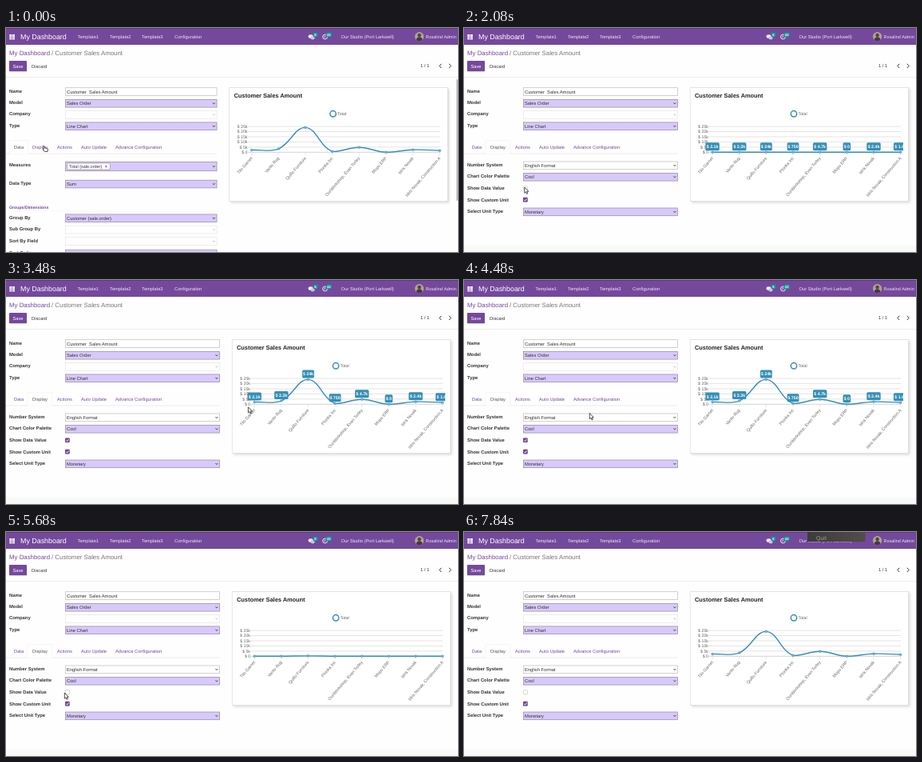
Write an HTML page that moves like this. It is 566 px wide and 280 px high and loops after 8.56 s.

```html
<!DOCTYPE html>
<html lang="en">
<head>
<meta charset="utf-8">
<title>Dashboard chart</title>
<style>
html, body { margin: 0; width: 100%; height: 100%; overflow: hidden; background: #fefefe; }
svg { display: block; width: 100%; height: 100%; }
text { font-family: "Liberation Sans", Arial, sans-serif; font-size: 5.75px; fill: #333; white-space: pre; text-rendering: geometricPrecision; }
.b { font-weight: bold; font-size: 5.85px; }
.w { fill: #fff; }
.nav { fill: #eee4f5; }
.p { fill: #74499c; }
.ax { font-size: 5.3px; fill: #666; }
</style>
</head>
<body>
<svg id="stage" viewBox="0 0 566 280" preserveAspectRatio="none"></svg>
<script>
const LOOP = 8560, OPEN = 480, LABELS_ON = 2080, LABELS_OFF = 5560, RISE = 1000;
const PURPLE = '#74499c', LILAC = '#d8c9fb', BLUE = '#368fb7';
const X0 = 311.1, STEP = 33.65, BASE = 155.3, UNIT = 1.288;

const points = [
  ['Tilo Garnet', 2.1, '$ 2.1k'], ['Vanto Rug', 3.3, '$ 3.3k'],
  ['Quillo Furniture', 24, '$ 24k'], ['Plonka Inc', .75, '$ 750'],
  ['OurWorkshop, Evan Torley', 4.7, '$ 4.7k'], ['Mopu ERP', 0, '$ 0'],
  ['Idris Novak', 2.4, '$ 2.4k'], ['Idris Novak, Construction A', 1.6, '$ 1.6k']
];

// time, x, y of the pointer tip
const path = [
  [480, 48, 148], [960, 66, 193.5], [1360, 70, 197], [1560, 75.5, 198.5], [2080, 75.5, 198.5],
  [2760, 302, 162], [2920, 303, 159], [3800, 303, 158], [4480, 157, 166], [4640, 92, 190],
  [4760, 88, 192], [5500, 73, 200.5], [5680, 73, 200.5], [6480, 304, 150], [6680, 505, -12]
];

const text = (x, y, s, cls = '', style = '', more = '') =>
  `<text x="${x}" y="${y}" class="${cls}" style="${style}" ${more}>${s}</text>`;
const rect = (x, y, w, h, fill, more = '') => `<rect x="${x}" y="${y}" width="${w}" height="${h}" fill="${fill}" ${more}/>`;
const line = (x1, y1, x2, y2, color, w = .7) =>
  `<path d="M${x1} ${y1}L${x2} ${y2}" stroke="${color}" stroke-width="${w}" fill="none"/>`;
const middle = 'text-anchor="middle"';

const chevron = (x, y, color = '#222') =>
  `<path d="M${x - 1.4} ${y - .7}l1.4 1.4 1.4-1.4" stroke="${color}" stroke-width=".9" fill="none"/>`;

function field(label, y, value, right, kind) {
  const fill = kind === 'lilac' ? LILAC : '#fff';
  const edge = { lilac: '#96899f', faint: '#e6e6e6' }[kind] || '#bdbdbd';
  const arrow = kind === 'plain' ? '' : chevron(right - 3.7, y, kind === 'faint' ? '#bbb' : '#222');
  return text(4, y + 1, label, 'b') +
    rect(74.5, y - 4.8, right - 74.5, 9.7, fill, `stroke="${edge}" stroke-width=".7"`) +
    text(76, y + 2.1, value) + arrow;
}

function check(y, id) {
  return rect(74.3, y - 2.7, 5.2, 5.2, '#fff', 'rx=".8" stroke="#bbb" stroke-width=".6"') +
    `<g ${id ? `id="${id}"` : ''}>${rect(74, y - 3, 5.7, 5.7, PURPLE, 'rx=".8"')}
    <path d="M75.3 ${y}l1.2 1.3 2-2.6" stroke="#fff" stroke-width=".9" fill="none"/></g>`;
}

function tabs(active, right) {
  const items = [['Data', 10, 12], ['Display', 33, 19], ['Actions', 64, 19], ['Auto Update', 94, 32], ['Advance Configuration', 137, 58]];
  return line(0, 157, right, 157, '#e2e2e2') + items.map(([name, x, w], i) => {
    const on = i === active;
    const box = on ? `<path d="M${x - 6} 157.5V140.5H${x + w + 6}V157.5" fill="#fefefe" stroke="#f0f0f0" stroke-width=".6"/>` : '';
    return box + text(x, 150.6, name, on ? '' : 'p', on ? 'fill:#5a5460' : '');
  }).join('');
}

function topFields(right) {
  return field('Name', 79.5, 'Customer  Sales Amount', right, 'plain') +
    field('Model', 94.2, 'Sales Order', right, 'lilac') +
    field('Company', 108.4, '', right, 'faint') +
    field('Type', 122.7, 'Line Chart', right, 'lilac');
}

function dataTab() {
  const r = 264;
  return topFields(r) + tabs(0, r) +
    text(4, 173, 'Measures', 'b') +
    rect(74.5, 167.3, r - 74.5, 11.4, LILAC, 'stroke="#96899f" stroke-width=".7"') +
    rect(76.5, 169, 54, 8, '#fff', 'rx="1.5" stroke="#8e7aa3" stroke-width=".6"') +
    text(79, 174.8, 'Total (sale.order)', '', 'font-size:5.5px') +
    line(124.2, 171.8, 126.6, 174.2, '#333') + line(126.6, 171.8, 124.2, 174.2, '#333') +
    chevron(r - 3.7, 173) +
    field('Data Type', 195, 'Sum', r, 'lilac') +
    text(4, 226, 'Groups/Dimensions', 'b p', 'font-size:5.2px') +
    line(4, 229, r, 229, '#f2f2f2') +
    field('Group By', 237.7, 'Customer (sale.order)', r, 'lilac') +
    field('Sub Group By', 252, '', r, 'faint') +
    field('Sort By Field', 266.5, '', r, 'faint') +
    field('Sort Order', 282, '', r, 'lilac') +
    rect(564, 64, 2, 152, '#bcbcbc', 'rx="1"');
}

function displayTab() {
  const r = 267.5;
  return rect(0, 272, 566, 8, '#f7faf6') + topFields(r) + tabs(1, r) +
    field('Number System', 171.8, 'English Format', r, 'white') +
    field('Chart Color Palette', 186.2, 'Cool', r, 'lilac') +
    text(4, 202.3, 'Show Data Value', 'b') + check(200.4, 'tick') +
    text(4, 216.8, 'Show Custom Unit', 'b') + check(214.8) +
    field('Select Unit Type', 229.8, 'Monetary', r, 'lilac');
}

function header() {
  const tiles = [0, 1, 2, 3, 4, 5].map(i =>
    rect(4.3 + i % 2 * 3.6, 8 + (i >> 1) * 2.3, 3.1, 1.8, '#fff')).join('');
  const badge = (x, n) => rect(x - 3, 5.4, n > 9 ? 7.5 : 6, 5.8, '#0d9d96', 'rx="2.8"') +
    text(x + (n > 9 ? .7 : 0), 9.9, n, 'w b', 'font-size:4.2px', middle);
  return rect(0, 0, 566, 21, PURPLE) + rect(0, 0, 566, .8, '#5c3a7c') + tiles +
    text(18, 14, 'My Dashboard', 'w', 'font-size:8.9px') +
    [['Template1', 89.5], ['Template2', 130], ['Template3', 170], ['Configuration', 211]]
      .map(([s, x]) => text(x, 12.6, s, 'nav')).join('') +
    '<ellipse cx="381.5" cy="10.5" rx="3" ry="2.3" fill="#eee"/><ellipse cx="384" cy="12.5" rx="2.6" ry="2" fill="#cfc0dc"/>' +
    badge(387.5, 6) +
    '<circle cx="399.5" cy="11" r="2.9" fill="none" stroke="#eee" stroke-width="1"/><path d="M399.5 9.3V11.3H398" stroke="#eee" stroke-width=".7" fill="none"/>' +
    badge(403.5, 42) +
    text(419.5, 12.6, 'Our Studio (Port Larkwell)', 'nav') +
    '<circle cx="517.6" cy="10.7" r="5.6" fill="#b0a48d"/><circle cx="517.6" cy="9" r="2.2" fill="#51433f"/><path d="M513.7 14.7q.6-3.5 3.9-3.5t3.9 3.5q-3.9 3.2-7.8 0" fill="#403a48"/>' +
    text(525.5, 12.6, 'Rosalind Admin', 'nav', 'font-size:5.5px') +
    text(4, 33.6, 'My Dashboard', 'p', 'font-size:7.85px') +
    text(57, 33.6, '/ Customer Sales Amount', '', 'font-size:7.85px;fill:#777') +
    rect(4, 41, 22, 13.2, PURPLE, 'rx=".8"') + text(15, 49.7, 'Save', 'w', '', middle) +
    text(32, 49.7, 'Discard') + text(519, 49.3, '1 / 1') +
    '<path d="M545.2 44.8l-2.4 2.6 2.4 2.6M554.8 44.8l2.4 2.6-2.4 2.6" stroke="#333" stroke-width="1" fill="none"/>' +
    line(0, 61.7, 566, 61.7, '#e4e4e4');
}

function chart() {
  const grid = [0, 5, 10, 15, 20, 25].map(v => {
    const y = BASE - v * UNIT;
    return line(306.5, y, 547, y, v ? '#d0d0d0' : '#b5b5b5', .6) +
      text(306, y + 1.9, v ? `$ ${v}k` : '$ 0', 'ax', '', 'text-anchor="end"');
  }).join('');
  const names = points.map(([s], i) => {
    const x = X0 + i * STEP;
    return line(x, BASE, x, 159, '#ccc', .5) +
      `<text class="ax" text-anchor="end" transform="translate(${x + 1.3} 163) rotate(-49)">${s}</text>`;
  }).join('');
  const dots = points.map((_, i) => `<circle class="dot" cx="${X0 + i * STEP}" r="1.3" fill="#8cc0d8" stroke="${BLUE}" stroke-width=".7"/>`).join('');
  const tags = points.map(([, , s], i) => {
    const w = s.length * 2.6 + 1.8;
    return `<g class="tag">${rect(-w / 2, -5, w, 10, BLUE, 'rx="1.5"')}${text(0, 1.9, s, 'w b', 'font-size:5.3px', middle)}</g>`;
  }).join('');
  return rect(285, 76, 273.5, 142.5, '#888', 'opacity=".3" filter="url(#soft)"') +
    rect(283.2, 74.5, 273.3, 142, '#fff', 'stroke="#dadada" stroke-width=".7"') +
    text(289, 86.6, 'Customer Sales Amount', 'b', 'font-size:7.4px;fill:#222') +
    `<circle cx="413" cy="107.3" r="3.7" fill="#fff" stroke="${BLUE}" stroke-width="1.5"/>` +
    text(418.5, 109.2, 'Total', 'ax') +
    `<g clip-path="url(#canvas)">${grid}${names}<path id="curve" fill="none" stroke="${BLUE}" stroke-width="1.4"/>${dots}<g id="tags">${tags}</g></g>`;
}

const stage = document.getElementById('stage');
stage.innerHTML = `<defs>
  <filter id="soft" x="-5%" y="-5%" width="110%" height="115%"><feGaussianBlur stdDeviation="1.6"/></filter>
  <clipPath id="canvas"><rect x="288" y="95" width="262" height="116.5"/></clipPath>
  <linearGradient id="dark" x2="1"><stop stop-color="#3d3a3b"/><stop offset="1" stop-color="#514d4b"/></linearGradient>
  </defs>
  ${rect(0, 0, 566, 280, '#fefefe')}
  <g id="dataTab">${dataTab()}</g><g id="displayTab">${displayTab()}</g>
  <g id="chart">${chart()}</g>${header()}
  <g id="menu">${rect(430, 0, 72.5, 12.2, 'url(#dark)')}${text(441, 10.3, 'Quit', '', 'font-size:7px;fill:#a09c9a')}</g>
  <path id="hand" d="M46.6 147.6q1-.8 1.5.4l.7 2.1 2.2.2q1.5.2 1.4 1.6l-.4 2.5h-3.6l-2.5-2.6q.2-1 1.5-.1z" fill="#fff" stroke="#222" stroke-width=".8"/>
  <path id="arrow" d="M.3 .5V7.8L1.9 6.3L3.1 8.8L4.3 8.3L3.2 5.8H5.3Z" fill="#fff" stroke="#222" stroke-width=".8"/>`;

const $ = id => document.getElementById(id);
const dots = [...stage.querySelectorAll('.dot')], tags = [...stage.querySelectorAll('.tag')];
const show = (id, on) => $(id).setAttribute('visibility', on ? 'visible' : 'hidden');
const clamp = (v, a, b) => Math.min(b, Math.max(a, v));

// Smooth line with tension .4, control points kept inside the plot
function spline(ys) {
  const at = i => [X0 + i * STEP, ys[i]];
  const n = ys.length;
  const control = i => {
    const a = at(Math.max(0, i - 1)), p = at(i), b = at(Math.min(n - 1, i + 1));
    const da = Math.hypot(p[0] - a[0], p[1] - a[1]), db = Math.hypot(b[0] - p[0], b[1] - p[1]);
    const k = .4 / (da + db);
    const side = (d, s) => [p[0] + s * k * d * (b[0] - a[0]), clamp(p[1] + s * k * d * (b[1] - a[1]), BASE - 25 * UNIT, BASE)];
    return [side(da, -1), side(db, 1)];
  };
  let d = `M${at(0)}`;
  for (let i = 1; i < n; i++) d += `C${control(i - 1)[1]} ${control(i)[0]} ${at(i)}`;
  return d;
}

function growth(t) {
  if (t < OPEN) return 1;
  const start = t < LABELS_ON ? OPEN : t < LABELS_OFF ? LABELS_ON : LABELS_OFF;
  return clamp((t - start) / RISE, 0, 1) ** 2;
}

function pointer(t) {
  const i = path.findIndex(k => k[0] > t);
  if (i < 0) return path[path.length - 1].slice(1);
  if (i === 0) return path[0].slice(1);
  const a = path[i - 1], b = path[i];
  const u = (t - a[0]) / (b[0] - a[0]), e = u * u * (3 - 2 * u);
  return [a[1] + (b[1] - a[1]) * e, a[2] + (b[2] - a[2]) * e];
}

function draw(t) {
  const opened = t >= OPEN, labelled = t >= LABELS_ON && t < LABELS_OFF;
  const p = growth(t);
  const ys = points.map(([, v]) => BASE - v * UNIT * p);
  show('dataTab', !opened);
  show('displayTab', opened);
  show('tick', t >= LABELS_ON + 80 && t < LABELS_OFF);
  show('tags', labelled);
  show('hand', !opened);
  show('arrow', opened);
  $('chart').setAttribute('transform', `translate(${opened ? 0 : -3.5} 0)`);
  $('curve').setAttribute('d', spline(ys));
  ys.forEach((y, i) => {
    dots[i].setAttribute('cy', y);
    tags[i].setAttribute('transform', `translate(${X0 + i * STEP} ${y - 7})`);
  });
  $('arrow').setAttribute('transform', `translate(${pointer(t)})`);
  $('menu').setAttribute('opacity', t < 7480 ? 0 : clamp((Math.floor((t - 7480) / 80) + 1) / 3, 0, 1));
}

const begin = performance.now();
function tick() {
  draw((performance.now() - begin) % LOOP);
  requestAnimationFrame(tick);
}
tick();
</script>
</body>
</html>
```
